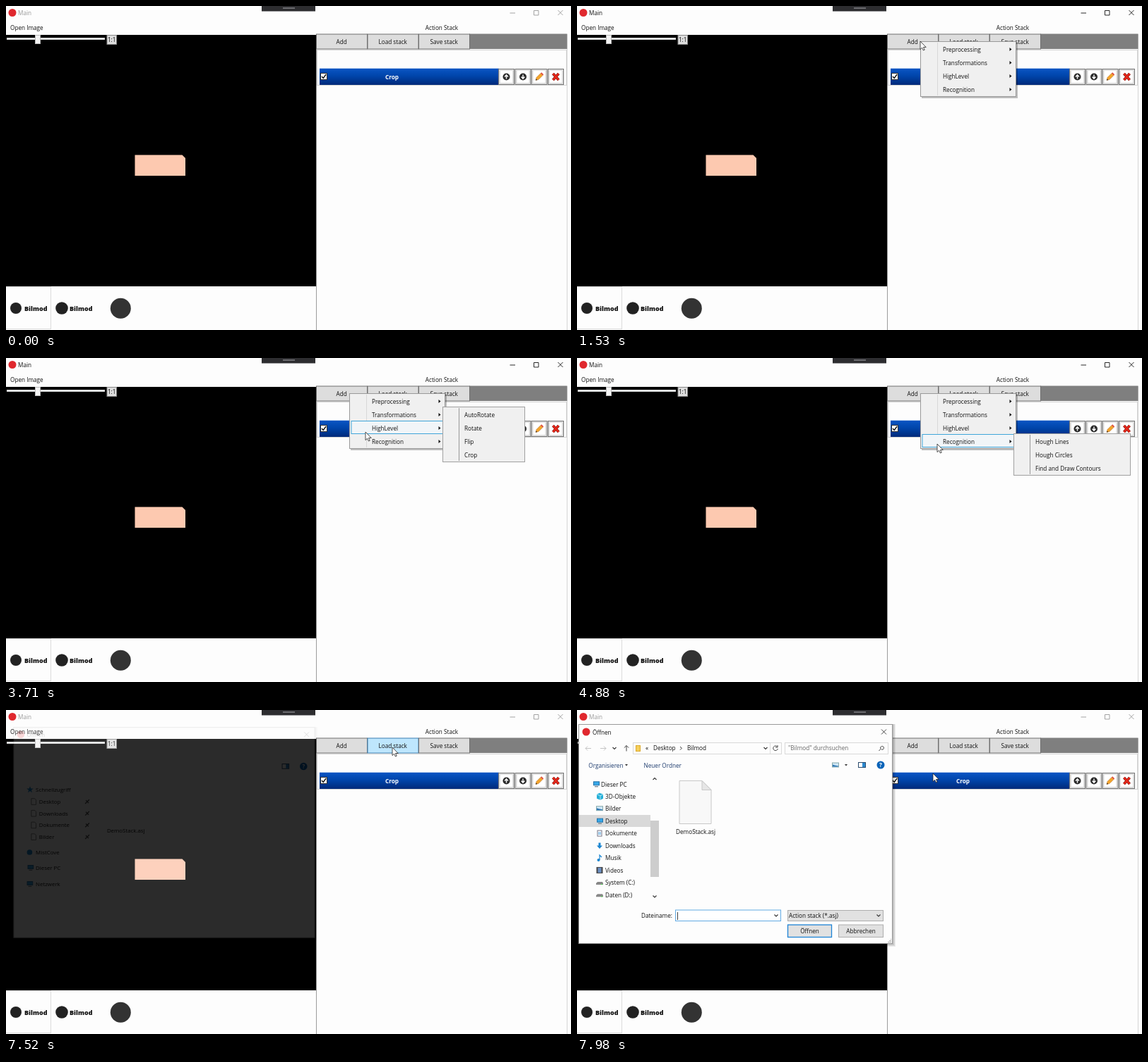
Recreate the animation shown at these times as an HTML page. Size 800 by 460 pixels, loop 8000 ms.

```html
<!DOCTYPE html>
<html lang="en">
<head>
<meta charset="utf-8">
<title>Action stack</title>
<style>
html, body { margin: 0; width: 100%; height: 100%; overflow: hidden; background: #fdfdfd; }
svg { display: block; }
text { font: 8.2px "Open Sans", "Noto Sans", sans-serif; white-space: pre; }
.bold { font-weight: 700; }
.brand { font-size: 9px; font-weight: 800; }
.mid { text-anchor: middle; }
.end { text-anchor: end; }
</style>
</head>
<body>
<svg id="stage" width="800" height="460" viewBox="0 0 800 460"></svg>
<script>
const LOOP = 8000;
const stage = document.getElementById('stage');
const $ = id => document.getElementById(id);

// Markup helpers
const box = (x, y, w, h, fill, line, more = '') => {
  const o = line ? .5 : 0;
  return `<rect x="${x + o}" y="${y + o}" width="${w - 2 * o}" height="${h - 2 * o}" fill="${fill}" stroke="${line || 'none'}" ${more}/>`;
};
const path = (d, fill = 'none', line = 'none', width = 1) =>
  `<path d="${d}" fill="${fill}" stroke="${line}" stroke-width="${width}"/>`;
const dot = (x, y, r, fill) => `<circle cx="${x}" cy="${y}" r="${r}" fill="${fill}"/>`;
const text = (x, y, s, cls = '', fill = '#111') =>
  `<text x="${x}" y="${y}" class="${cls}" fill="${fill}">${s}</text>`;
const group = (id, body, more = '') => `<g id="${id}" ${more}>${body}</g>`;
const cross = (x, y, line) => path(`M${x - 3.5} ${y - 3.5}l7 7m0-7l-7 7`, 'none', line, .9);
const chevron = (x, y, dir = 1) =>
  path(`M${x - 2.5} ${y - dir}l2.5 ${2.5 * dir} 2.5 ${-2.5 * dir}`, 'none', '#333', 1.1);
const caret = (x, y) => path(`M${x - 2} ${y - 1}h4l-2 2.4z`, '#333');

const BUTTONS = [['Add', 439], ['Load stack', 511.5], ['Save stack', 584]];
const MENU = [
  ['Preprocessing', 148, ['Grayscale', 'Threshold', 'Adaptive Threshold', 'Gaussian Blur',
    'Median Blur', 'Dilate', 'Erode', 'Invert', 'Canny']],
  ['Transformations', 117, ['AutoRotate', 'Rotate', 'Flip', 'Crop']],
  ['HighLevel', 140, ['Shape Detection', 'Color Filter', 'Histogram']],
  ['Recognition', 166, ['Hough Lines', 'Hough Circles', 'Find and Draw Contours']]
];
const ROW = 19;

function mainWindow() {
  const tool = (x, icon) => box(x, 89, 23, 23, '#ddd', '#777') + box(x + 3, 92, 17, 17, '#fff') +
    `<g transform="translate(${x + 11.5} 100.5)">${icon}</g>`;
  const arrow = dir => dot(0, 0, 5, '#2b2b2b') +
    path(`M0 ${3 * dir}V${-2 * dir}M-2.4 0L0 ${-2.6 * dir} 2.4 0`, 'none', '#fff', 1.4);
  const pencil = path('M-5 5l1-4 6-6 3 3-6 6z', '#f4a52b', '#a8672a', .5) +
    path('M2-5l1.2-1.2 3 3L5-2z', '#e0463c') + path('M-5 5l.6-2 1.5 1.5z', '#222');
  const redX = path('M-4-4.5L4 4.5M4-4.5L-4 4.5', 'none', '#7e1008', 3.8) +
    path('M-4-4.5L4 4.5M4-4.5L-4 4.5', 'none', '#e8271a', 2.6);

  return `<defs><linearGradient id="blue" x2="0" y2="1">
      <stop stop-color="#0a55c4"/><stop offset=".45" stop-color="#0045ab"/>
      <stop offset="1" stop-color="#002a7a"/></linearGradient></defs>` +
    box(0, 0, 800, 460, '#fdfdfd') +
    dot(9, 9.5, 5.5, '#e0282e') +
    group('chrome', text(17, 13, 'Main', '', 'currentColor') +
      path('M713.5 10h7.5M747.5 6.5h6.5v6.5h-6.5z', 'none', 'currentColor', .9) +
      cross(785, 9.5, 'currentColor')) +
    box(362, 0, 76, 7.5, '#2d2d30') + box(392, 2, 17, 2, '#6c6c70') +
    text(6, 34, 'Open Image') + text(617, 33.5, 'Action Stack', 'mid') +
    // Viewer
    box(0, 41, 439, 357, '#000') +
    path('M182.5 211.5H249.5L254 216V241H182.5z', '#fdc9b0') +
    box(1, 45, 139, 3, '#e7eaea', '#d6d6d6') + box(41, 41, 8, 13, '#f4f4f4', '#bbb') +
    box(142.5, 41, 14.5, 14, '#ddd', '#888') + text(149.7, 51, '1:1', 'mid') +
    // Thumbnails
    box(-1, 398, 65, 61, '#fdfdfd', '#dcdcdc') +
    dot(14, 429, 8, '#222') + text(26, 432.5, 'Bilmod', 'brand') +
    dot(79, 429, 8.8, '#222') + text(90, 432.5, 'Bilmod', 'brand') +
    dot(162.3, 429.3, 14.5, '#333') +
    // Stack panel
    box(439, 40, 1, 420, '#9c9c9c') + box(794, 40, 1, 420, '#d5d5d5') +
    box(656, 39.5, 138.5, 21.5, '#7f7f7f') +
    BUTTONS.map(([s, x], i) => box(x, 39.5, 73, 22, '#ddd', '#707070', `id="button${i}"`) +
      text(x + 36.2, 53.5, s, 'mid')).join('') +
    box(440, 62, 354, 51, '#fdfdfd', '#d4d4d4') +
    box(444, 88.7, 254, 23.3, 'url(#blue)') +
    box(445, 95, 10, 10, '#fff', '#333') + path('M447 100l2.2 2.5 4-5.5', 'none', '#111', 1.4) +
    text(546.5, 103.5, 'Crop', 'bold mid', '#fff') +
    tool(697, arrow(1)) + tool(720.5, arrow(-1)) + tool(743.5, pencil) + tool(767, redX);
}

function menus() {
  const panel = (x, y, w, h) => box(x + 2, y + 2, w, h, '#000', '', 'opacity=".25"') +
    box(x, y, w, h, '#f0f0f0', '#999');
  const root = panel(486, 50, 136, 79) + box(510, 52, 1, 75, '#d8d8d8') +
    box(488.5, 51, 131, 19, '#f1f5f8', '#3fa5d9', 'id="mark"') +
    MENU.map(([s], i) => text(518, 64.5 + i * ROW, s) +
      path(`M612.5 ${59 + i * ROW}l3 2.5-3 2.5z`, '#111')).join('');
  const subs = MENU.map(([, w, items], i) => {
    const y = 50 + i * ROW, h = items.length * ROW + 3;
    return group('sub' + i, box(618, y, w, h, '#f0f0f0', '#a0a0a0') +
      box(641, y + 2, 1, h - 4, '#999') +
      items.map((s, j) => text(649, y + 14.5 + j * ROW, s)).join(''));
  });
  return group('menu', root + subs.join(''));
}

function dialog() {
  const at = (x, y, s) => `<g transform="translate(${x} ${y})">${s}</g>`;
  const blue = '#1c86d1';
  const screen = box(-4, -4, 9, 6, '#35a7e8', '#2672a8') + box(-2, 3, 5, 1, '#567');
  const photo = box(-5, -4, 10, 7, '#cfe7f7', '#8aa') + path('M-4 2v-3l3 1 5 1v1z', '#2f78b5');
  const page = box(-3.5, -4.5, 7, 9, '#fff', '#778') + path('M-2-1h4M-2 1h4', 'none', blue, .8);
  const down = path('M-1.5-4h3v4h2.5L0 4.5-4 0h2.5z', blue);
  const cube = path('M-4-3L0-5 5-3V3L1 5-4 3z', '#25b0d8') + path('M-4-3L1-1 5-3M1-1V5', 'none', '#d8f4fb', .8);
  const note = dot(-1.5, 3, 2, blue) + path('M0 3V-4l3 3', 'none', blue, 1.2);
  const film = box(-4.5, -4.5, 9, 9, '#444') + box(-2.5, -3.5, 5, 7, '#6b8fc2');
  const drive = path('M-5 1l2-2h7l1 2v2h-10z', '#888') + box(2, 2, 2, 1, '#4d4');
  const places = [['Dieser PC', screen], ['3D-Objekte', cube], ['Bilder', photo], ['Desktop', screen],
    ['Dokumente', page], ['Downloads', down], ['Musik', note], ['Videos', film],
    ['System (C:)', drive], ['Daten (D:)', drive]];
  const pinned = ['Desktop', 'Downloads', 'Dokumente', 'Bilder'];
  const star = path('M0-5L1.3-1.6H5L2 .7 3 4.3 0 2-3 4.3-2 .7-5-1.6H-1.3z', blue);

  const shadow = [1, 2, 3, 4].map(i => box(2, 20, 445 + i, 312 + i, '#000', '', 'opacity=".07"')).join('');
  const frame = shadow + box(2, 20, 445, 312, '#fdfdfd', '#999') +
    dot(13, 31, 5.5, '#e0282e') + text(22, 34.5, 'Öffnen') + cross(434.5, 31, '#333') +
    box(398, 74, 11, 8, '#fff', '#2a4a6c') + box(404, 75, 4, 6, '#2c8ad0') +
    dot(430, 78, 5.5, '#0a63b8') + text(430, 81, '?', 'bold mid', '#fff') +
    text(168, 176, 'DemoStack.asj', 'mid');

  const early = at(26.6, 112.5, star) + text(35, 115.5, 'Schnellzugriff') +
    pinned.map((s, i) => {
      const y = 130.2 + i * 17.4;
      return at(32, y, path('M-3.5-4.5h5l2 2v7h-7z', 'none', '#666', .8)) + text(40, y + 3, s) +
        at(111, y, path('M-3 3L0 0M-2-2l4 4M0 0l3-3', 'none', '#555', 1.4));
    }).join('') +
    dot(26, 205.2, 4, blue) + text(35, 208.2, 'MistCove') +
    at(27, 228, screen) + text(35, 231, 'Dieser PC') +
    at(26, 252, screen) + text(35, 255, 'Netzwerk');

  const late =
    path('M20 54.5h-8m3-3l-3 3 3 3M33 54.5h8m-3-3l3 3-3 3', 'none', '#c4c4c4', 1) +
    chevron(53, 54) + path('M70 58.5v-8m-3.2 3.2l3.2-3.2 3.2 3.2', 'none', '#444', 1) +
    box(79, 46, 211, 17, '#fdfdfd', '#d9d9d9') + box(83, 50, 7, 9, '#f5cf5b', '#dba92c') +
    text(97, 57, '«') + text(108, 57, 'Desktop') + path('M146 52l2.3 2.3-2.3 2.3', 'none', '#333') +
    text(156, 57, 'Bilmod') + chevron(267, 54) + box(273, 47, 1, 15, '#ddd') +
    path('M283.5 52a3.3 3.3 0 1 0 .8 3M284 50v3h-3', 'none', '#444') +
    box(294, 46, 147, 17, '#fdfdfd', '#d9d9d9') + text(299, 57, '"Bilmod" durchsuchen', '', '#666') +
    path('M427.5 58l2.6-2.8a2.4 2.4 0 1 1 .6.6', 'none', '#444') +
    text(16.3, 81.5, 'Organisieren', '', '#1e3c6e') + caret(70, 78) +
    text(94.5, 81.5, 'Neuer Ordner', '', '#1e3c6e') + at(366, 78.5, photo) + caret(381, 78) +
    box(3, 149, 101, 17, '#d9d9d9') +
    places.map(([s, icon], i) => {
      const y = 105.3 + i * 17.45;
      return at(i ? 32 : 27, y, icon) + text(i ? 40 : 34, y + 3.2, s);
    }).join('') +
    chevron(110, 98, -1) + box(104, 157, 12, 80, '#cdcdcd') + chevron(110, 264.5) +
    path('M145 100.5h32l13 13V161.5h-45z', '#f8f8f8', '#c8c8c8') +
    path('M177 100.5v13h13z', '#e6e6e6', '#c8c8c8') +
    text(135, 295, 'Dateiname:', 'end') + box(139, 283.5, 150, 16.5, '#fff', '#62abe4') +
    box(142, 287, .8, 11, '#111') + chevron(282, 291.5) +
    box(298, 284, 136, 16, '#e1e1e1', '#adadad') + text(300, 295, 'Action stack (*.asj)') + chevron(427, 291.5) +
    box(298, 304.5, 63, 18.5, '#e1e1e1', '#1f84d6', 'stroke-width="1.3"') +
    text(329.5, 317, 'Öffnen', 'mid') +
    box(370, 304.5, 64, 18.5, '#e1e1e1', '#adadad') + text(402, 317, 'Abbrechen', 'mid') +
    path('M440 329.5h5M442 327.5h3M444 325.5h1', 'none', '#aaa', 1);

  return group('dialog', frame + group('early', early) + group('late', late));
}

stage.innerHTML = mainWindow() + menus() + dialog() +
  group('cursor', path('M0 0V11.6L2.6 9.2 4.4 13 6.2 12.2 4.5 8.5H8.2z', '#fff', '#222', .8));

// Number of n evenly spaced changes (first at a, last at b) done by time t
const done = (t, a, b, n) =>
  t < a ? 0 : Math.min(n, Math.floor((t - a) / ((b - a) / (n - 1)) + 1e-6) + 1);

// Pointer moves: first change, last change, changes, end x, end y
const START = [717, 498];
const MOVES = [
  [530, 1070, 8, 486, 50], [1910, 2080, 3, 511, 63], [2700, 2930, 4, 510, 80],
  [3560, 3710, 3, 509, 105], [4480, 4560, 2, 510, 122], [5960, 6270, 5, 530, 166],
  [6500, 7280, 11, 547, 53], [7600, 7980, 6, 504, 90]
];
const SUB_TIMES = [2390, 3250, 4020, 4880];
const MENU_END = 6270;
const FADE = [0, .17, .45, .72, .92, 1, 1, 1];

function pointer(t) {
  let [x, y] = START;
  for (const [a, b, n, ex, ey] of MOVES) {
    const k = done(t, a, b, n) / n;
    x += (ex - x) * k;
    y += (ey - y) * k;
    if (k < 1) break;
  }
  return [x, y];
}

const set = (id, name, value) => $(id).setAttribute(name, value);

function draw(t) {
  const [x, y] = pointer(t);
  set('cursor', 'transform', `translate(${x} ${y})`);
  set('chrome', 'color', t >= 1220 && t < 7360 ? '#111' : '#999');

  const menu = t < MENU_END ? Math.max(0, done(t, 1220, 1530, 5) - 1) / 4 : 0;
  set('menu', 'opacity', menu);
  const row = Math.min(3, Math.floor((y - 52) / ROW));
  set('mark', 'opacity', row < 0 ? 0 : 1);
  set('mark', 'y', 51.5 + row * ROW);
  const open = SUB_TIMES.filter(s => t >= s).length - 1;
  MENU.forEach((_, i) =>
    set('sub' + i, 'opacity', i !== open ? 0 : i ? 1 : done(t, 2390, 2550, 3) / 3));

  BUTTONS.forEach(([, bx], i) => {
    const hover = !menu && x >= bx && x < bx + 72.5 && y >= 40 && y < 61;
    set('button' + i, 'fill', hover ? '#bee6fd' : '#ddd');
    set('button' + i, 'stroke', hover ? '#3c7fb1' : '#707070');
  });

  const k = done(t, 7520, 7980, 7);
  const grow = Math.min(1, Math.max(0, k - 1) / 2);
  set('dialog', 'opacity', FADE[k]);
  set('dialog', 'transform',
    `translate(${224 + .5 * grow} ${174 + 2 * grow}) scale(${.96 + .04 * grow}) translate(-224.5 -176)`);
  set('early', 'opacity', k < 4 ? 1 : 0);
  set('late', 'opacity', k < 4 ? 0 : 1);
}

function tick() {
  draw(performance.now() % LOOP);
  requestAnimationFrame(tick);
}
tick();
</script>
</body>
</html>
```
